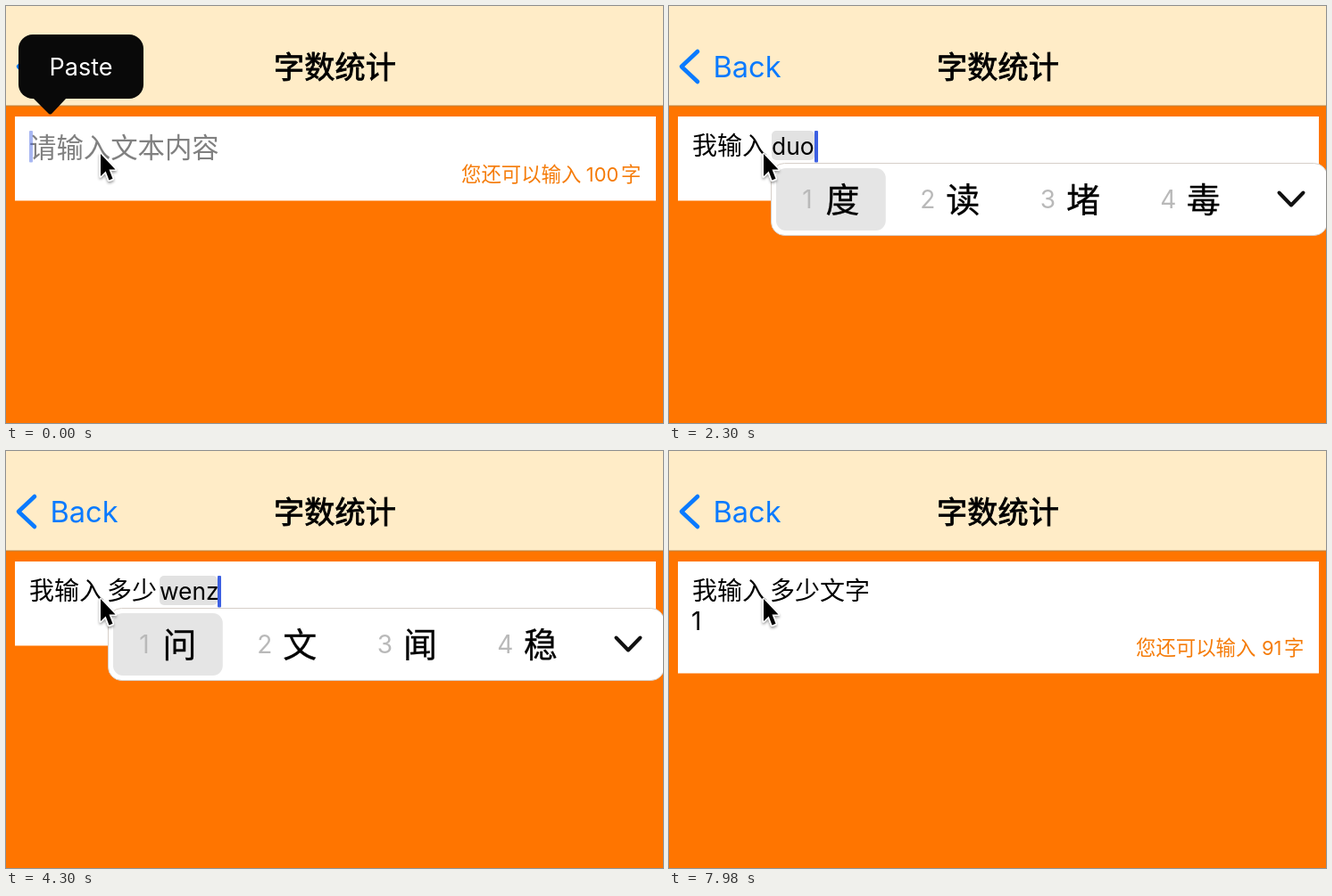
These frames come from a looping animation (736 px wide and 468 px high, 8 s). An HTML page:

```html
<!DOCTYPE html>
<html lang="zh-CN">
<head>
<meta charset="utf-8">
<title>字数统计</title>
<style>
  html, body { margin: 0; width: 100%; height: 100%; overflow: hidden; background: #ff7500; }
  svg { display: block; width: 736px; height: 468px; }
  text { font-family: "Noto Sans CJK SC", "Noto Sans CJK", sans-serif; white-space: pre; }
  .latin { font-family: Inter, Roboto, sans-serif; }
  .title { font-size: 34.2px; text-anchor: middle; stroke: #000; stroke-width: .8; }
  .body { font-size: 28px; }
  .count text { font-size: 22.4px; fill: #f57c0a; }
  .count .latin { font-size: 22px; }
  .num { font-size: 28px; fill: #b9b9b9; text-anchor: middle; }
  .cand { font-size: 38px; text-anchor: middle; stroke: #000; stroke-width: .3; }
  .line { fill: none; stroke-linecap: round; stroke-linejoin: round; }
</style>
</head>
<body>
<svg viewBox="0 0 736 468">
  <defs>
    <radialGradient id="face" cx=".5" cy=".35" r=".65">
      <stop offset="0" stop-color="#ffe066"/>
      <stop offset=".6" stop-color="#fbbe38"/>
      <stop offset="1" stop-color="#e58a1c"/>
    </radialGradient>
    <filter id="shade" x="-50%" y="-50%" width="200%" height="200%">
      <feDropShadow dx="0" dy="2" stdDeviation="1.6" flood-opacity=".4"/>
    </filter>
  </defs>

  <rect width="736" height="468" fill="#ff7500"/>
  <rect width="736" height="112" fill="#ffecc7"/>
  <rect y="111.500" width="736" height="1" fill="#b9813f"/>
  <path class="line" d="M32 51 14 68 32 85" stroke="#0a7aff" stroke-width="4.6"/>
  <text class="latin" x="49.5" y="80" font-size="32.6" fill="#0a7aff">Back</text>
  <text class="title" x="368.500" y="80.500">字数统计</text>

  <rect id="card" x="10" y="124" width="718" fill="#fff"/>
  <text id="hint" x="26" y="169.5" font-size="30.4" fill="#808080">请输入文本内容</text>
  <rect id="mark" y="140" height="33" rx="5" fill="#e2e2e2"/>
  <text id="head" class="body" x="26" y="167"></text>
  <text id="tail" class="body" x="113" y="167"></text>
  <text id="typed" class="latin" y="167" font-size="26.4"></text>
  <text id="second" class="latin" x="25" y="201" font-size="28"></text>
  <g id="count" class="count">
    <text id="lead" y="197.3">您还可以输入</text>
    <text id="left" class="latin" x="686.5" y="197" text-anchor="end"></text>
    <text x="689" y="197.3">字</text>
  </g>
  <rect id="caret" width="4" height="35.5" rx="1" fill="#3d60e2"/>

  <g id="popup"></g>

  <g id="paste">
    <path d="M30 103H68L52 120Q49.500 123 47 120Z" fill="#090909"/>
    <rect x="14" y="32" width="140" height="72" rx="16" fill="#090909"/>
    <text class="latin" x="84" y="78" font-size="27" fill="#fff" text-anchor="middle">Paste</text>
  </g>

  <path d="M106 166V191L111.700 185.500 115.500 195.500 119.500 193.800 115.500 183.500H122.500Z"
    stroke="#fff" stroke-width="3" paint-order="stroke" stroke-linejoin="round" filter="url(#shade)"/>
</svg>
<script>
const LOOP = 8000;
const TEXT = "我输入多少文字";
const el = id => document.getElementById(id);

// time, committed characters, mark x, marked letters, caret x, candidates, popup x, characters left
const STEPS = [
  [0, 0, 26, "", 26, "", 26, 100],
  [400, 0, 26, "w", 46, "", 26, 100],
  [450, 0, 26, "w", 46, "我 为 无 问", 26, 100],
  [790, 0, 26, "wo", 61.5, "我 为 无 问", 26, 100],
  [840, 0, 26, "wo", 61.5, "我 喔 😯 窝", 26, 100],
  [1000, 0, 26, "wo s", 83, "我是 我说 我上", 26, 100],
  [1200, 0, 26, "wo s r", 101, "我输入 我收入", 26, 100],
  [1440, 3, 110, "", 110, "", 114, 97],
  [2030, 3, 115, "d", 131, "", 114, 97],
  [2080, 3, 115, "d", 131, "的 都 到 大", 114, 97],
  [2160, 3, 115, "du", 147, "的 都 到 大", 114, 97],
  [2210, 3, 115, "du", 147, "度 读 堵 毒", 114, 97],
  [2290, 3, 115, "duo", 163, "度 读 堵 毒", 114, 97],
  [2340, 3, 115, "duo", 163, "多 朵 躲 夺", 114, 97],
  [2580, 3, 115, "duos", 177, "多 朵 躲 夺", 114, 97],
  [2630, 3, 115, "duos", 177, "多少 多数 多谁", 114, 97],
  [2850, 3, 115, "duosh", 193, "多少 多数 多谁", 114, 97],
  [3100, 5, 169, "", 169, "", 114, 95],
  [3480, 5, 172, "w", 192, "", 114, 95],
  [3530, 5, 172, "w", 192, "我 为 无 问", 114, 95],
  [3750, 5, 172, "we", 207, "我 为 无 问", 114, 95],
  [4020, 5, 172, "wen", 223, "我 为 无 问", 114, 95],
  [4070, 5, 172, "wen", 223, "问 文 闻 稳", 114, 95],
  [4300, 5, 172, "wenz", 237, "问 文 闻 稳", 114, 95],
  [4350, 5, 172, "wenz", 237, "文字 蚊子 文章", 114, 95],
  [4580, 5, 172, "wenzi", 243, "文字 蚊子 文章", 114, 95],
  [4780, 7, 224, "", 224, "", 114, 93],
  [5520, 7, 26, "", 26, "", 114, 92],
  [7150, 7, 39, "", 39, "", 114, 91]
];

// The caret dims whenever it has rested, and a key press lights it again.
const CARET = [[0, .45], [30, .45], [150, 1], [5200, 1], [5420, 0], [5519, 0], [5520, 1],
  [6030, 1], [6250, 0], [6330, 0], [6480, 1], [6850, 1], [7070, 0], [7149, 0], [7150, 1],
  [7680, 1], [7950, 0]];
const PASTE = [[0, 1], [400, 1], [580, 0]];

function ramp(keys, t) {
  const i = keys.findIndex(k => k[0] > t);
  if (i < 0) return keys[keys.length - 1][1];
  const [a, u] = keys[i - 1], [b, v] = keys[i];
  return u + (v - u) * (t - a) / (b - a);
}

const face = x => `<g transform="translate(${x} 217)">
  <circle r="20" fill="url(#face)"/>
  <g fill="#5a3410"><ellipse cx="-7.500" cy="-2" rx="2.4" ry="3.2"/><ellipse cx="7.500" cy="-2" rx="2.4" ry="3.2"/>
  <ellipse cy="9.500" rx="3.4" ry="3.8"/></g>
  <path class="line" d="M-12-9Q-9-13-5-13M12-9Q9-13 5-13" stroke="#8a541c" stroke-width="1.8"/></g>`;

function popup(words, x) {
  if (!words) return "";
  const list = words.split(" ");
  const pitch = 539 / list.length;
  let out = `<rect x=".5" y="176.500" width="623" height="81" rx="15" fill="#fff" stroke="#d6cfc8"/>
    <rect x="6" y="182" width="${pitch - 12}" height="70" rx="11" fill="#e5e5e5"/>
    <path class="line" d="M569.500 209.500 583 223.500 596.500 209.500" stroke="#111" stroke-width="4"/>`;
  list.forEach((word, i) => {
    const emoji = word === "😯";
    const wide = emoji ? 38 : word.length * 38;
    const mid = 67.5 + pitch * i;
    const cx = mid + 13;
    const nx = mid - 7.5 - wide / 2 - (emoji ? 4 : 0);
    out += `<text class="latin num" x="${nx}" y="227">${i + 1}</text>`;
    out += emoji ? face(cx) : `<text class="cand" x="${cx}" y="231">${word}</text>`;
  });
  return `<g transform="translate(${x})">${out}</g>`;
}

function show([t, n, mx, letters, cx, words, px, left]) {
  const second = left < 93;
  const set = (id, name, v) => el(id).setAttribute(name, v);
  el("hint").style.display = n || letters ? "none" : "";
  el("head").textContent = TEXT.slice(0, Math.min(n, 3));
  el("tail").textContent = TEXT.slice(3, Math.max(n, 3));
  el("typed").textContent = letters;
  set("typed", "x", mx);
  set("mark", "x", mx);
  set("mark", "width", letters ? cx - mx : 0);
  el("second").textContent = left === 91 ? "1" : "";
  set("card", "height", second ? 125.5 : 94.5);
  set("count", "transform", `translate(0 ${second ? 31.5 : 0})`);
  set("lead", "x", left === 100 ? 510 : left === 91 ? 523 : 520);
  el("left").textContent = left;
  set("caret", "x", cx);
  set("caret", "y", second ? 171.5 : 140);
  el("popup").innerHTML = popup(words, px);
}

let shown = null;
function frame() {
  const t = performance.now() % LOOP;
  const step = STEPS.filter(s => s[0] <= t).pop();
  if (step !== shown) show(shown = step);
  el("caret").setAttribute("opacity", ramp(CARET, t));
  el("paste").setAttribute("opacity", ramp(PASTE, t));
  requestAnimationFrame(frame);
}
frame();
</script>
</body>
</html>
```
